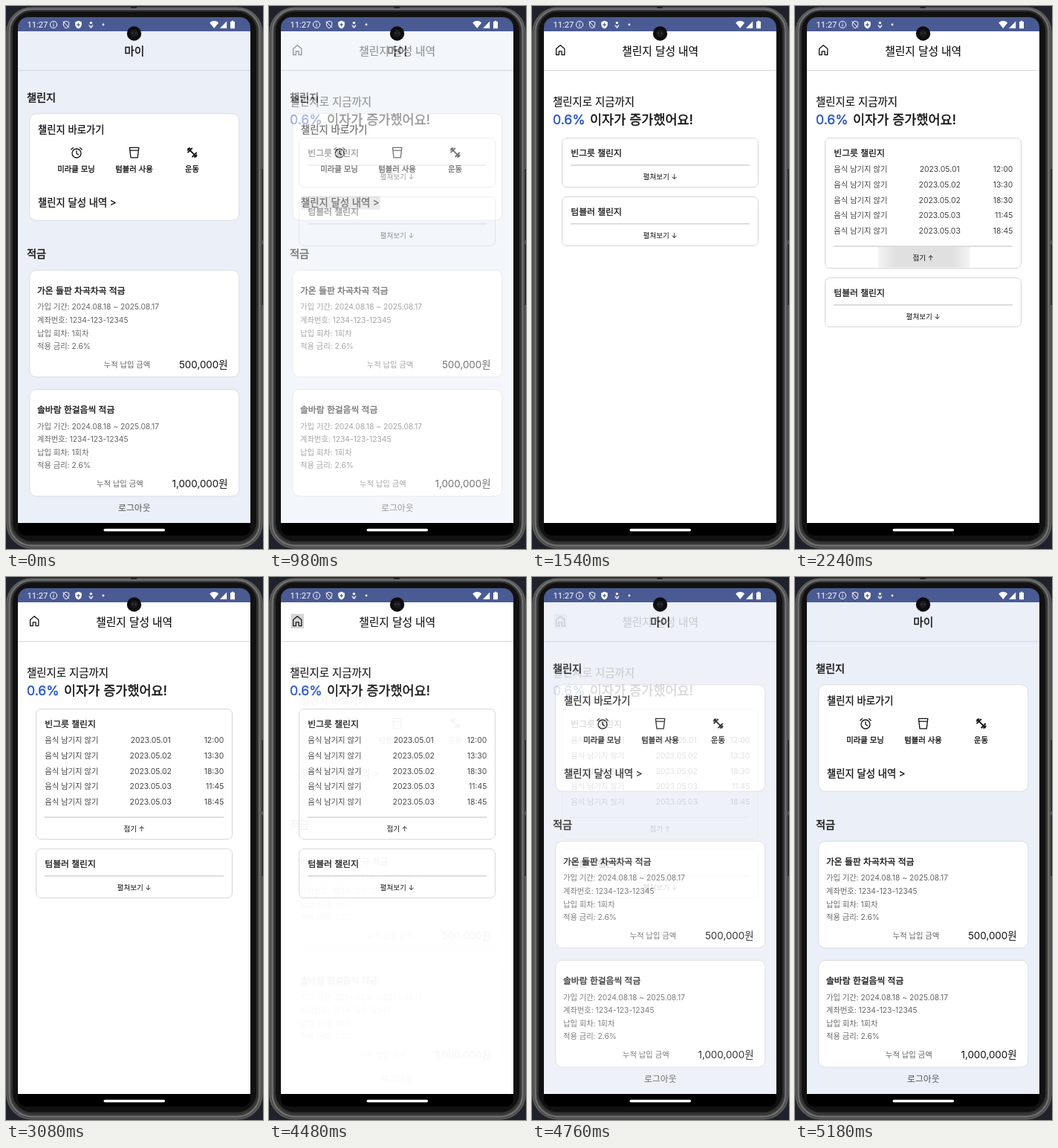
An HTML page for the animation above (5.39 s loop, 346 px wide and 730 px high).

```html
<!DOCTYPE html>
<html lang="ko">
<head>
<meta charset="utf-8">
<title>마이</title>
<style>
  html, body { margin: 0; width: 100%; height: 100%; overflow: hidden; background: #20222b; }
  svg { display: block; width: 346px; height: 730px; }
  text { font-family: Inter, "Noto Sans CJK KR", "Noto Sans KR", "Noto Sans CJK", sans-serif; }
  .line { fill: none; stroke: #111; stroke-width: 1.3; stroke-linejoin: round; }
</style>
</head>
<body>
<svg id="stage" viewBox="0 0 346 730"></svg>
<script>
const LOOP = 5390;
const INK = '#111', GRAY = '#666';

// y is the visual centre of the line; bold is an outline that thickens the glyphs
function text(x, y, size, str, { fill = INK, anchor = 'start', bold = 0 } = {}) {
  const outline = bold ? ` stroke="${fill}" stroke-width="${bold}"` : '';
  return `<text x="${x}" y="${(y + size * 0.36).toFixed(2)}" font-size="${size}"
    fill="${fill}" text-anchor="${anchor}"${outline}>${str}</text>`;
}

const box = (x, y, w, h, r, fill, stroke = 'none', width = 1) =>
  `<rect x="${x}" y="${y}" width="${w}" height="${h}" rx="${r}" fill="${fill}" stroke="${stroke}" stroke-width="${width}"/>`;

const rule = (x1, x2, y, color) =>
  `<path d="M${x1} ${y}H${x2}" stroke="${color}" stroke-width="1"/>`;

const mid = { anchor: 'middle' };

function device() {
  return box(0, 1.5, 346, 728, 34, '#3a3a3a') +
    box(1.5, 2.5, 343, 726, 33, 'none', '#5c5c5c', 2) +
    box(4.5, 4.5, 337, 721, 30, 'none', '#707070', 2.5) +
    box(8, 6.5, 330, 714, 27, '#111', '#303030', 2) +
    box(168, 1, 8, 2, 1, '#222') +
    box(344.6, 219, 1.4, 96, 0, '#1c1c1c') +
    box(344.6, 320, 1.4, 82, 0, '#1c1c1c') +
    box(16, 680, 313, 32, 10, '#000') +
    box(131.5, 702.8, 82.5, 3.4, 1.7, '#fff');
}

function statusBar() {
  return `<path d="M16 35V29a14 14 0 0 1 14-14H315a14 14 0 0 1 14 14V35z" fill="#4a5a93"/>` +
    `<text x="28.5" y="29" font-size="11.2" fill="#fff" style="font-family:Roboto,sans-serif">11:27</text>` +
    `<g fill="none" stroke="#fff" stroke-width="1">
      <circle cx="64" cy="25" r="4.6"/><path d="M64 24.4v3.2M64 22.2v1.1"/>
      <path d="M77.5 21.8L81 20.3l3.7 1.6v3q0 3.4-3.7 5-3.7-1.6-3.7-5zM76.8 20.6l8 8.6"/>
      <path d="M112 25.2q0 3.6 2.4 4 2.4-.4 2.4-4M114.4 26v3.4" />
    </g>
    <g fill="#fff">
      <path d="M97.5 19.8l4.3 1.7v3.3q0 4-4.3 5.7-4.3-1.7-4.3-5.7v-3.3z"/>
      <path d="M97.5 22.8v4.6M95.2 25.1h4.6" stroke="#4a5a93" stroke-width="1.2"/>
      <circle cx="114.4" cy="22.6" r="1.7"/>
      <circle cx="131" cy="25" r="1.4"/>
      <path d="M274.2 22.4a8.6 8.6 0 0 1 12 0L280.2 30z"/>
      <path d="M288 30h9.2v-9.6z"/>
      <path d="M302 21h1.7v-1.3h2.6V21h1.7v9.2h-6z"/>
    </g>`;
}

function camera() {
  return `<circle cx="172.5" cy="37" r="9.7" fill="#0d0d0f"/>
    <circle cx="172.5" cy="37" r="5" fill="#1b1b1e"/>
    <circle cx="170.3" cy="36.6" r="1.1" fill="#3b3b40"/><circle cx="174.7" cy="36.6" r="1.1" fill="#3b3b40"/>`;
}

const header = (title, bold, color) =>
  text(172.7, 61, 14.7, title, { ...mid, bold }) + rule(16, 329, 86.7, color);

function saving(y, name, amount, labelX) {
  const rows = ['가입 기간: 2024.08.18 ~ 2025.08.17', '계좌번호: 1234-123-12345', '납입 회차: 1회차', '적용 금리: 2.6%'];
  return box(31.8, y, 282, 143.6, 9, '#fff', '#d9dce3') +
    text(42, y + 27.6, 11.8, name, { bold: 0.3 }) +
    rows.map((r, i) => text(42, y + 49.6 + i * 17.6, 10.25, r, { fill: GRAY })).join('') +
    text(labelX, y + 127, 10.3, '누적 납입 금액', { fill: GRAY }) +
    text(298.6, y + 127, 13.4, amount, { anchor: 'end' });
}

function icons() {
  const plates = [-1, 1].map(s => `M${s * 4.2} -4.4V4.4M${s * 6.6} -2.6V2.6`).join('');
  return `<g class="line">
      <circle cx="95" cy="198" r="6"/><path d="M95 194.3v4l2.8 1.8M87.4 193.2l3.5-3M102.6 193.2l-3.5-3"/>
      <path d="M166.4 190.3h12.4l-1.6 13.6h-9.2zM167 194.2h11.2"/>
      <g transform="translate(250.7 197) rotate(45)"><path d="M-8.3 0H8.3${plates}" stroke-width="1.9"/></g>
    </g>`;
}

function homeScreen() {
  const names = ['미라클 모닝', '텀블러 사용', '운동'];
  return box(16, 34, 313, 661, 0, '#ebeff7') +
    header('마이', 0.35, '#cfd3dd') +
    text(28, 122.5, 14.2, '챌린지', { bold: 0.4 }) +
    box(31.8, 144.8, 282, 143.4, 9, '#fff', '#d9dce3') +
    text(43, 166, 13.3, '챌린지 바로가기', { bold: 0.3 }) +
    icons() +
    names.map((n, i) => text(94.5 + i * 78, 219.5, 10.3, n, { ...mid, bold: 0.3 })).join('') +
    `<g id="press">${box(43, 256, 106.5, 17.5, 0, 'rgba(0,0,0,.14)')}</g>` +
    text(43, 264.5, 13.3, '챌린지 달성 내역 >', { bold: 0.3 }) +
    text(28, 333, 14.2, '적금', { bold: 0.4 }) +
    saving(355.2, '가온 들판 차곡차곡 적금', '500,000원', 131.7) +
    saving(515.4, '솔바람 한걸음씩 적금', '1,000,000원', 122) +
    text(172.8, 674.8, 11.8, '로그아웃', { ...mid, fill: '#555' });
}

function panel(y, h, title, label, extra = '') {
  const bottom = y + h;
  return box(40.5, y, 264, h, 6.5, '#fff', '#d6d6d6') +
    text(52.3, y + 20.5, 11.8, title, { bold: 0.25 }) + extra +
    rule(52, 293, bottom - 29.5, '#bdbdbd') +
    text(172.6, bottom - 14, 9.6, label, mid);
}

function records() {
  const log = [['01', '12:00'], ['02', '13:30'], ['02', '18:30'], ['03', '11:45'], ['03', '18:45']];
  const fill = '#444';
  return log.map(([day, time], i) => {
    const y = 219.7 + i * 20.6;
    return text(52.3, y, 10.3, '음식 남기지 않기', { fill }) +
      text(194.7, y, 10.4, '2023.05.' + day, { ...mid, fill }) +
      text(293.3, y, 10.4, time, { anchor: 'end', fill });
  }).join('');
}

function detailScreen() {
  const ripple = `<g id="ripple">${box(112, 324, 123.5, 27.5, 0, 'url(#glow)')}</g>`;
  return box(16, 34, 313, 661, 0, '#fff') +
    header('챌린지 달성 내역', 0.15, '#d5d5d5') +
    `<g id="back">${box(29.5, 49.5, 17.5, 19.5, 0, 'rgba(0,0,0,.17)')}</g>` +
    `<path class="line" d="M32.6 57.4L38.2 52.8l5.6 4.6v8.3h-3.7v-4.9h-3.8v4.9h-3.7z"/>` +
    text(28, 128.8, 14.4, '챌린지로 지금까지', { bold: 0.15 }) +
    text(28, 152.3, 17.6, '0.6%', { fill: '#2a57c8', bold: 0.45 }) +
    text(78, 152.3, 17.5, '이자가 증가했어요!', { bold: 0.4 }) +
    `<g id="closed">${panel(177.5, 66, '빈그릇 챌린지', '펼쳐보기 ↓')}</g>` +
    `<g id="open">${panel(177.5, 175, '빈그릇 챌린지', '접기 ↑', records() + ripple)}</g>` +
    `<g id="lower">${panel(256.4, 66, '텀블러 챌린지', '펼쳐보기 ↓')}</g>`;
}

const cursor = `<path id="cursor" d="M108.3 261.5v13.2l3-2.7 2.1 4.8 2.2-1-2.1-4.6h4.2z"
  fill="#111" stroke="#fff" stroke-width=".8"/>`;

document.getElementById('stage').innerHTML =
  `<defs><linearGradient id="glow">
    <stop offset="0" stop-color="#f3f3f3"/><stop offset=".2" stop-color="#e0e0e0"/>
    <stop offset=".8" stop-color="#e0e0e0"/><stop offset="1" stop-color="#f3f3f3"/>
  </linearGradient></defs>` +
  device() + statusBar() +
  `<g id="home">${homeScreen()}</g><g id="detail">${detailScreen()}</g>` +
  cursor + camera();

// Each step is [ms, value] and holds until the next one
function hold(id, prop, steps) {
  const frames = steps.map(([ms, value]) => ({ offset: ms / LOOP, [prop]: value, easing: 'step-end' }));
  frames.push({ offset: 1, [prop]: steps[steps.length - 1][1] });
  document.getElementById(id).animate(frames, { duration: LOOP, iterations: Infinity });
}

const STEP = 70, ENTER = 840, EXPAND = 2240, LEAVE = 4480;
const FADE = [0.04, 0.2, 0.42, 0.65, 0.84, 0.96, 0.985, 1];
const fade = (start, map) => FADE.map((v, i) => [start + i * STEP, map(v)]);

hold('detail', 'opacity', [[0, 0], ...fade(ENTER, v => v), ...fade(LEAVE, v => 1 - v)]);
hold('press', 'opacity', [[0, 0], [ENTER, 1], [1400, 0]]);
hold('back', 'opacity', [[0, 0], [LEAVE, 1], [5040, 0]]);
hold('cursor', 'opacity', [[0, 0], [1190, 1], [1400, 0]]);
hold('closed', 'opacity', [[0, 1], [EXPAND, 0]]);
hold('open', 'opacity', [[0, 0], [EXPAND, 1]]);
hold('lower', 'transform', [[0, 'translateY(0px)'], [EXPAND, 'translateY(109px)']]);
hold('ripple', 'opacity', [[0, 0], [EXPAND, 1], [EXPAND + STEP, 0.4], [EXPAND + 2 * STEP, 0]]);
</script>
</body>
</html>
```
